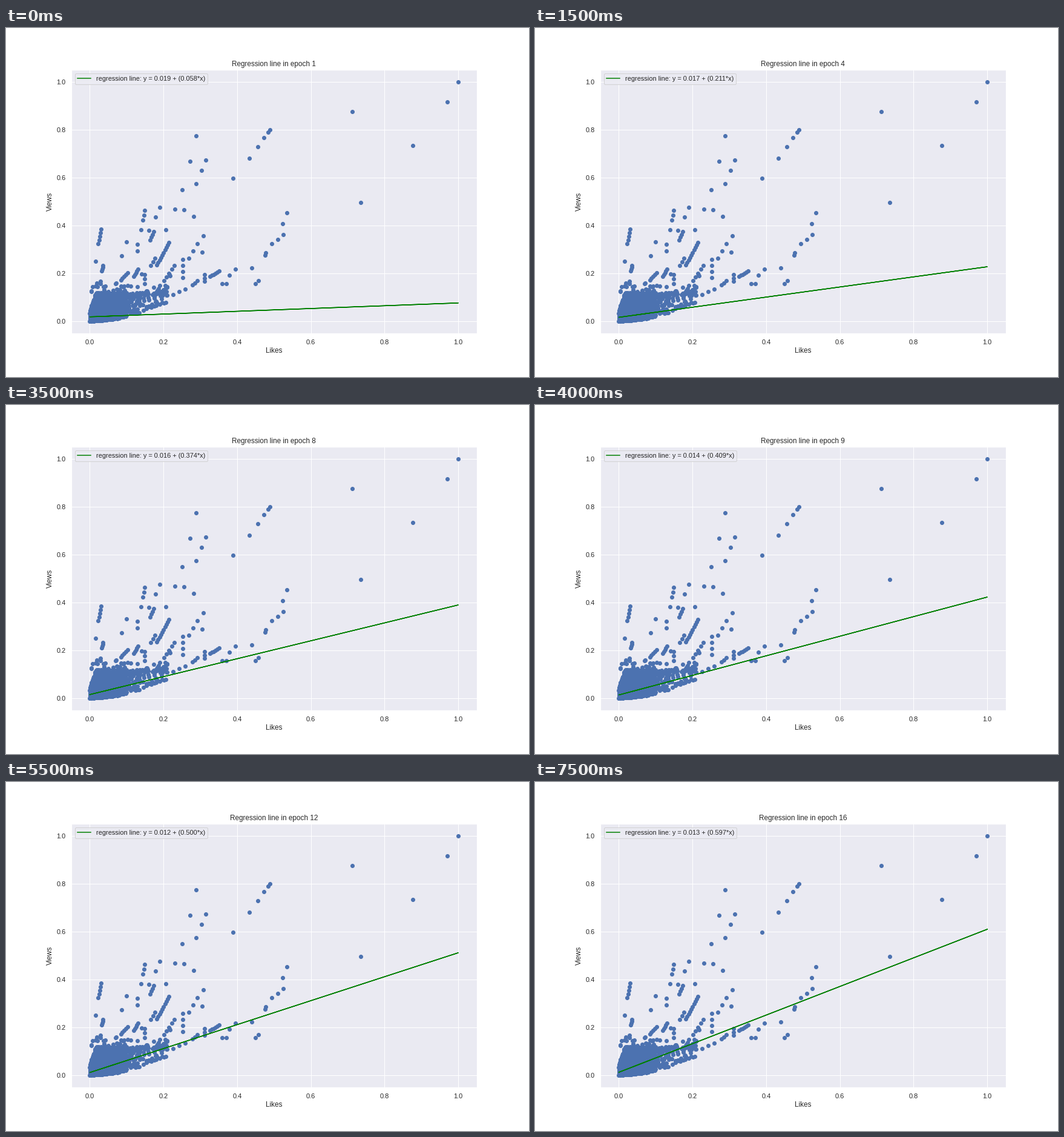
Write a matplotlib script that moves like this. It is 864x576 px and loops after 8000 ms.

```python
import numpy as np
import matplotlib.pyplot as plt
from matplotlib.animation import FuncAnimation

INK, PANEL, BLUE = "0.15", "#EAEAF2", "#4C72B0"
EPOCHS, INTERVAL = 16, 500

plt.rcParams.update({
    "font.family": "Liberation Sans",
    "text.color": INK,
    "axes.labelcolor": INK,
    "axes.facecolor": PANEL,
    "axes.edgecolor": "white",
    "axes.linewidth": 1.25,
    "axes.grid": True,
    "axes.axisbelow": True,
    "axes.labelsize": 11.8,
    "axes.titlesize": 11.8,
    "grid.color": "white",
    "grid.linewidth": 1,
    "lines.linewidth": 1.5,
    "xtick.color": INK, "ytick.color": INK,
    "xtick.labelsize": 11, "ytick.labelsize": 11,
    "xtick.bottom": False, "ytick.left": False,
    "xtick.major.size": 6, "ytick.major.size": 6,
    "legend.fontsize": 11,
})

rng = np.random.default_rng(7)


def strand(n, start, end, ease=1):
    """n dots from start to end, bunching towards the end when ease > 1."""
    t = 1 - (1 - np.linspace(0, 1, n)[:, None]) ** ease
    return np.array(start) + t * np.subtract(end, start)


def band(n, left, right, low, high, skew=1):
    """n random dots between the curves low(x) and high(x)."""
    x = left + (right - left) * rng.random(n) ** skew
    return np.c_[x, low(x) + (high(x) - low(x)) * rng.random(n)]


outliers = np.array([
    (0, 0), (1, 1), (.97, .916), (.877, .734), (.712, .875), (.735, .496),
    (.389, .597), (.289, .774), (.272, .668), (.289, .575), (.251, .549),
    (.231, .468), (.256, .466), (.282, .438), (.19, .476), (.178, .435),
    (.308, .357), (.305, .289), (.206, .382), (.139, .382), (.16, .38),
    (.1, .332), (.086, .274), (.016, .251), (.44, .223),
])

strands = [
    strand(5, (.433, .681), (.489, .8), 1.8),
    strand(2, (.303, .63), (.315, .673)),
    strand(2, (.524, .408), (.535, .453)),
    strand(3, (.494, .324), (.525, .362)),
    strand(2, (.476, .276), (.478, .286)),
    strand(2, (.45, .157), (.458, .17)),
    strand(2, (.359, .157), (.371, .157)),
    strand(2, (.379, .193), (.395, .218)),
    strand(6, (.326, .187), (.351, .21)),
    strand(3, (.312, .167), (.312, .195)),
    strand(3, (.279, .152), (.292, .17)),
    strand(4, (.252, .183), (.252, .258)),
    strand(3, (.269, .264), (.292, .324)),
    strand(10, (.182, .236), (.215, .329)),
    strand(5, (.201, .17), (.229, .233)),
    strand(3, (.226, .112), (.259, .135)),
    strand(3, (.165, .233), (.177, .264)),
    strand(4, (.164, .339), (.173, .375)),
    strand(3, (.144, .423), (.149, .463)),
    strand(2, (.129, .294), (.129, .322)),
    strand(5, (.023, .324), (.031, .385)),
    strand(4, (.032, .21), (.036, .233)),
    strand(5, (.119, .188), (.131, .218)),
    strand(5, (.084, .172), (.103, .203)),
    strand(3, (.057, .013), (.08, .013)),
]

cloud = [
    # packed corner, floor, thinning tail, loose dots above
    band(1500, 0, .1,
         lambda x: .14 * x + .4 * np.clip(x - .08, 0, 1),
         lambda x: np.minimum(.045 + 4.5 * x, .119), 1.15),
    band(90, 0, .045, lambda x: .12 * x, lambda x: .12 * x + .004),
    band(130, .096, .213,
         lambda x: .034 + .5 * np.clip(x - .13, 0, 1),
         lambda x: .115 + .24 * (x - .096), 1.5),
    band(26, .003, .1, lambda x: .118 + 0 * x, lambda x: .168 + 0 * x),
    band(14, .1, .22, lambda x: .135 + 0 * x, lambda x: .2 + 0 * x),
]

xs, ys = rng.permutation(np.vstack([outliers, *strands, *cloud])).T


def fit(epoch):
    """Intercept wanders; slope approaches its limit geometrically."""
    intercept = np.interp(epoch, [1, 4, 8, 11, 14, 16],
                          [.019, .017, .016, .011, .014, .013])
    return intercept, .926 * (1 - .93735 ** epoch)


fig, ax = plt.subplots(figsize=(12, 8), dpi=72, facecolor="white")
fig.subplots_adjust(left=0.125, right=0.9, bottom=0.125, top=0.88)
ax.scatter(xs, ys, s=36, color=BLUE)
line, = ax.plot(xs, ys, color="green", label="regression line")
ticks = np.linspace(0, 1, 6)
ax.set(xlim=(-0.05, 1.05), ylim=(-0.05, 1.05), xticks=ticks, yticks=ticks,
       xlabel="Likes", ylabel="Views")
title = ax.set_title("")
label = ax.legend(loc="upper left").get_texts()[0]


def update(i):
    a, b = fit(i + 1)
    line.set_ydata(a + b * xs)
    title.set_text(f"Regression line in epoch {i + 1}")
    label.set_text(f"regression line: y = {a:.3f} + ({b:.3f}*x)")
    return line, title, label


anim = FuncAnimation(fig, update, frames=EPOCHS, interval=INTERVAL,
                     init_func=lambda: update(0), repeat=True, repeat_delay=0)
plt.show()
```
